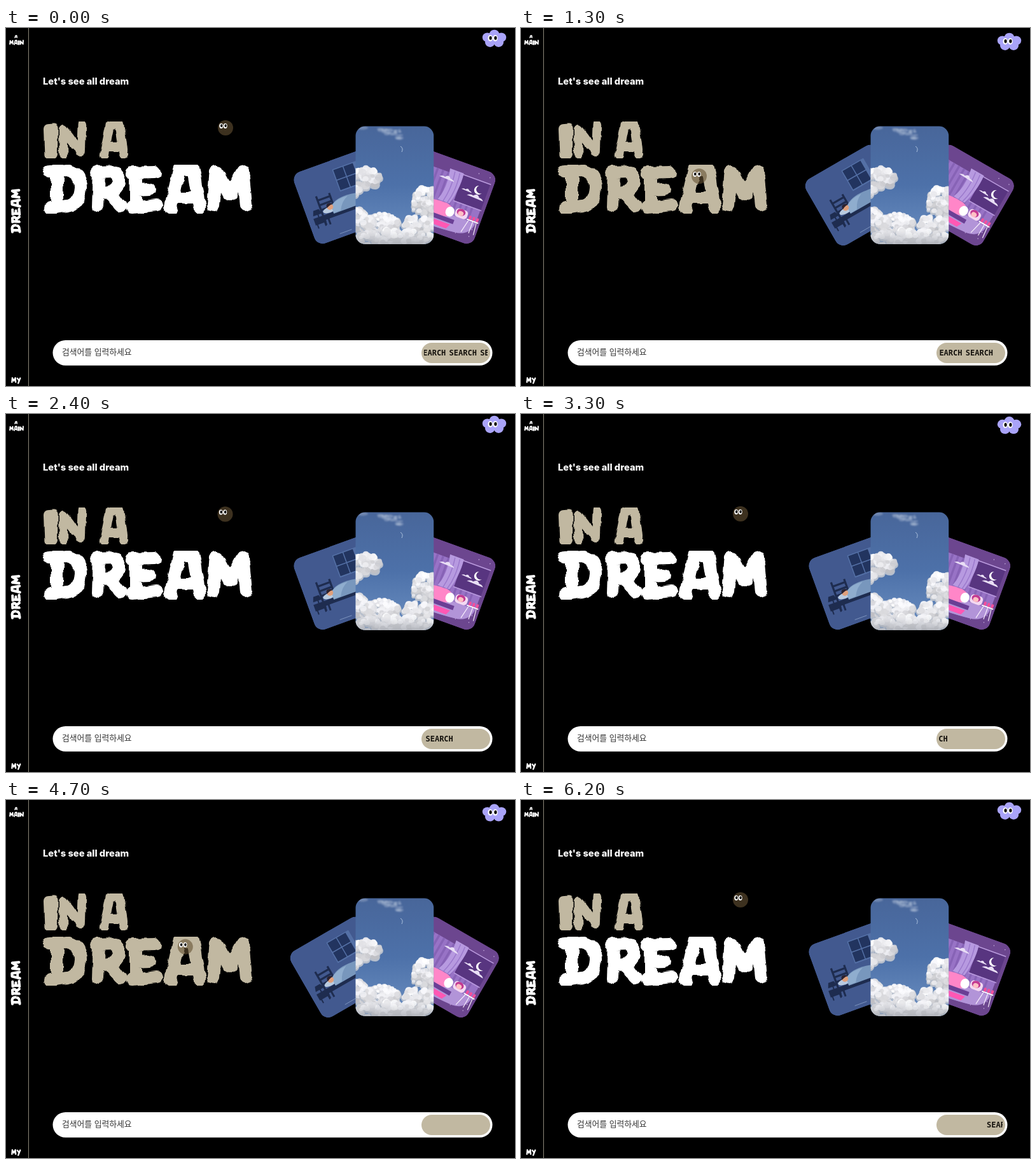
These frames come from a looping animation (800 by 563 pixels, 6300 ms). An HTML page:

```html
<!DOCTYPE html>
<html lang="ko">
<head>
<meta charset="utf-8">
<title>Dream</title>
<style>
  html, body { margin: 0; width: 100%; height: 100%; overflow: hidden; background: #000; }
  svg { display: block; width: 100vw; height: 100vh; }
  .ink { fill: none; stroke-width: 20; stroke-linecap: round; stroke-linejoin: round; }
  .lead { font: 800 14.7px Inter, "Open Sans", sans-serif; fill: #fff; }
  .hint { font: 12.8px "Noto Sans CJK KR", "Noto Sans CJK", sans-serif; fill: #333; }
  .roll { font: 700 12px "DejaVu Sans Mono", monospace; word-spacing: -2px; fill: #15120d; }
</style>
</head>
<body>
<svg id="stage" viewBox="0 0 800 563" preserveAspectRatio="none"></svg>
<script>
const TAN = '#c1b8a1', LOOP = 6300, STEP = 100;

// Brush letters: advance width and centre line in a box 85 high.
const BRUSH = {
  ' ': [26, ''],
  I: [34, 'M10 20L23 19L22 73H12Z'],
  N: [65, 'M12 71L11 21L52 68L54 11'],
  D: [70, 'M11 15L38 13Q61 16 60 41Q58 66 40 69L12 73M23 15V72'],
  R: [60, 'M14 16L44 15Q57 30 42 45L22 49M19 16L17 70M36 48L52 69'],
  E: [58, 'M11 17L46 16M17 17V70M17 44L38 43M10 71L50 67'],
  A: [69, 'M13 74L27 13L49 11L59 71M25 56H50'],
  M: [74, 'M12 68L17 15L37 52L58 14L63 67'],
  y: [60, 'M12 20L30 42M50 18L24 80']
};

function word(text, x, y, sx, sy, color, id = '') {
  let pen = 0, marks = '';
  for (const ch of text) {
    const [advance, d] = BRUSH[ch];
    marks += `<path d="${d}" transform="translate(${pen})"/>`;
    pen += advance;
  }
  return `<g ${id && `id="${id}"`} class="ink" role="img" aria-label="${text}" stroke="${color}"
    transform="translate(${x} ${y}) scale(${sx} ${sy})"><g filter="url(#wobble)">${marks}</g></g>`;
}

const rect = (x, y, w, h, fill, r = 0) =>
  `<rect x="${x}" y="${y}" width="${w}" height="${h}" rx="${r}" fill="${fill}"/>`;
const oval = (x, y, rx, ry, fill, more = '') =>
  `<ellipse cx="${x}" cy="${y}" rx="${rx}" ry="${ry}" fill="${fill}" ${more}/>`;
const path = (d, fill, more = '') => `<path d="${d}" fill="${fill}" ${more}/>`;
const line = (d, color, w) => path(d, 'none', `stroke="${color}" stroke-width="${w}"`);
const many = (n, make) => Array.from({ length: n }, (_, i) => make(i)).join('');
const eyes = (x, y, gap, rx, ry) => many(2, i =>
  oval(x + i * gap, y, rx, ry, '#fff') + oval(x + i * gap + .4, y - .3, rx * .55, ry * .6, '#000'));

let seed = 7;
const rnd = () => (seed = seed * 16807 % 2147483647) / 2147483647;

// A heap of puffs: grey bellies, then lit tops, small and irregular.
function heap(x, y, w, h, n) {
  let low = '', high = '';
  for (let i = 0; i < n; i++) {
    const a = rnd() * 6.283, d = Math.sqrt(rnd()), s = 3 + rnd() * 4.5;
    const px = x + Math.cos(a) * d * w, py = y + Math.sin(a) * d * h;
    const v = Math.round(205 + 45 * rnd() - 22 * Math.sin(a) * d);
    low += oval(px, py + 2, s, s * .9, '#b7bfcc');
    high += oval(px, py, s * .85, s * .75, `rgb(${v},${v},${v + 4})`, 'opacity=".85"');
  }
  return low + high;
}

function photo() {
  const wisps = many(26, () => {
    const f = rnd();
    return oval(588 + 34 * f, 158 + 14 * f * rnd() + 4 * rnd(), 2 + 4 * rnd(), 1 + 2 * rnd(), '#b5c4da', 'opacity=".35"');
  });
  return `<g clip-path="url(#front)">
    ${rect(549, 154, 124, 187, 'url(#sky)')}
    <g filter="url(#haze)">${wisps}${oval(560, 157, 9, 3, '#a9bad3', 'opacity=".4"')}</g>
    ${line('M620 186q5 3 2 9', '#a9bfdc', 1)}
    <g filter="url(#soft)">
      ${heap(564, 235, 24, 15, 70)}
      ${heap(550, 258, 8, 8, 14)}
      ${heap(660, 274, 25, 23, 100)}
      ${heap(554, 302, 12, 20, 36)}
      ${heap(588, 309, 28, 18, 90)}
      ${heap(650, 308, 26, 12, 60)}
      ${heap(611, 331, 64, 13, 150)}
    </g>
    ${rect(549, 318, 124, 23, 'url(#base)')}
  </g>`;
}

function night() {
  const ink = '#1e2c4f';
  return rect(-50, -66.5, 130, 120, '#42598f', 14) +
    rect(13, -52, 40, 37, '#5470a6', 1) +
    many(4, i => rect(14.5 + i % 2 * 17, -50.5 + (i >> 1) * 17.5, 15.5, 16, '#22345f')) +
    line('M-25-21V27M-4-19V6M-25-14H-4M-25-6H-4M-25 2H-4', ink, 3.2) +
    path('M-25 11H80V19H-25Z', ink) + rect(-20, 18, 3, 10, ink) +
    oval(-12, 6, 11, 4.5, '#b9cbe0') +
    path('M-7 1Q4-9 28-6Q50-3 80 2V14H-8Z', '#7897bd') +
    path('M-7 1Q4-7 22-5Q10 0 4 13H-8Z', '#8fadce') +
    oval(-10, 2, 5, 4.6, '#e0a07c') +
    path('M-15 2Q-16-5-9-4Q-5-3-5-1Q-10-1-15 2Z', '#2a2230') +
    path('M-37-1h9l3 8h-15Z', ink) + rect(-33, 6, 2, 6, ink) +
    rect(-41, 11, 18, 11, ink) + line('M-38 20V28M-26 20V28', ink, 2) +
    line('M-10 47H10', '#8fa5cc', .7);
}

function dusk() {
  const stars = many(40, () => oval(-40 + rnd() * 88, -64 + rnd() * 115, .7, .7, '#d9c4ee'));
  const bars = many(13, i => rect(-80 + i * 9, -44, 3.5, 62, '#8763b6'));
  const puff = (x, y, s) =>
    `<g transform="translate(${x} ${y}) scale(${s})">${path('M-12 0q5-4 9-2q5-6 9 0q5 0 7 3z', '#e9def5')}</g>`;
  return rect(-80, -66.5, 130, 120, '#6c468f', 14) + stars +
    path('M-80-44H20Q44-42 43-16V20Q40 40 16 42Q-20 46-80 44Z', '#9873c6') + bars +
    path('M-80 18H42Q40 40 16 42Q-20 46-80 44Z', '#b294d8') +
    rect(-1, -47, 45, 42, '#583580') + line('M-2-48H45M-2-4H45', '#b99add', 1.5) +
    path('M-24-50H-1Q2-26-6 2H-26Q-17-20-24-50Z', '#b79ae0') +
    line('M-15-48Q-11-22-17 2M-7-48Q-3-20-10 2', '#9b79cc', 1.5) +
    path('M28-40A7 7 0 1 0 36-30A6 6 0 0 1 28-40Z', '#fff') +
    puff(-24, -33, 1) + puff(28, -20, 1.1) + puff(12, -26, .7) +
    path('M-70 16Q-40 2-14 3Q0 2 4 14Q2 24-16 26H-70Z', '#ff86c8') +
    path('M-70 24H10V31H-70Z', '#6a3f95') +
    oval(-1, 14, 7, 8, '#fff') +
    rect(7, 4, 20, 14, '#f4d9f2', 5) + oval(16, 9, 7, 5.5, '#c23a92') + oval(16, 11, 4.4, 3.8, '#ffc0c4') +
    path('M-40 33H6L2 41H-44Z', '#ff58b4') +
    rect(28, 15, 19, 2, '#fff') + line('M31 17L26 38M38 17V36M44 17L46 36', '#f6ecfb', 1.2) +
    many(3, i => rect(30 + i * 6, 9, 4, 6, '#f2509c', 1));
}

const petals = many(5, i => {
  const a = (i * 72 - 90) * Math.PI / 180;
  return oval(11.5 * Math.cos(a), 1 + 7 * Math.sin(a), 7.8, 7.3, '#a9a3f8');
});

document.getElementById('stage').innerHTML = `
  <defs>
    <linearGradient id="sky" x2="0" y2="1">
      <stop stop-color="#48669a"/><stop offset=".5" stop-color="#4d71a9"/><stop offset="1" stop-color="#6b8fc1"/>
    </linearGradient>
    <linearGradient id="base" x2="0" y2="1">
      <stop stop-color="#a4a8b0" stop-opacity="0"/><stop offset="1" stop-color="#a4a8b0" stop-opacity=".7"/>
    </linearGradient>
    <filter id="soft"><feGaussianBlur stdDeviation=".6"/></filter>
    <filter id="haze"><feGaussianBlur stdDeviation="1.2"/></filter>
    <filter id="wobble" color-interpolation-filters="sRGB">
      <feTurbulence type="fractalNoise" baseFrequency=".07" numOctaves="1" seed="4"/>
      <feDisplacementMap in="SourceGraphic" scale="9" xChannelSelector="R" yChannelSelector="G"/>
    </filter>
    <clipPath id="front">${rect(549.5, 154.5, 122.7, 185.5, '#000', 15)}</clipPath>
    <clipPath id="slot">${rect(657, 497, 100, 28, '#000')}</clipPath>
    <clipPath id="cardL">${rect(-50, -66.5, 130, 120, '#000', 14)}</clipPath>
    <clipPath id="cardR">${rect(-80, -66.5, 130, 120, '#000', 14)}</clipPath>
  </defs>
  ${rect(0, 0, 800, 563, '#000')}
  ${rect(35, 0, 1, 563, '#8c8779')}
  ${word('A', 13, 11, .075, .06, '#fff')}
  ${word('MAIN', 5, 18.5, .095, .1, '#fff')}
  <g transform="translate(7 323) rotate(-90)">${word('DREAM', 0, 0, .212, .2, '#fff')}</g>
  ${word('My', 8, 548.5, .115, .125, '#fff')}
  <text class="lead" x="58" y="89">Let's see all dream</text>
  ${word('IN A', 59, 143.5, .686, .765, TAN)}
  ${word('DREAM', 57, 211, 1, 1, '#fff', 'title')}
  <g id="left"><g clip-path="url(#cardL)">${night()}</g></g>
  <g id="right"><g clip-path="url(#cardR)">${dusk()}</g></g>
  ${photo()}
  ${rect(73.5, 491, 691, 39.7, '#fff', 20)}
  <text class="hint" x="88" y="514">검색어를 입력하세요</text>
  ${rect(653, 495, 108, 32, TAN, 16)}
  <g clip-path="url(#slot)"><g id="roll" class="roll">
    <text x="788.5" y="515" text-anchor="end">SEARCH SEARCH SEARCH</text>
    <text x="953.3" y="515">SEARCH SEARCH SEARCH</text>
  </g></g>
  <g id="cloud">${petals}${oval(0, 1, 11, 8, '#a9a3f8')}${eyes(-6.3, 0, 7.8, 3.8, 5)}</g>
  <g id="ball">${oval(0, 0, 12, 12, 'rgb(101,82,52)', 'opacity=".6"')}${eyes(-6.7, -3, 6.4, 3, 4)}</g>`;

// The pointer visits the title twice; everything else follows from that.
const HOVERS = [[.8, 1.95], [3.9, 5.1]];
const ease = f => (f = Math.min(1, Math.max(0, f)), f * f * (3 - 2 * f));
const visit = (t, span, lead) => HOVERS.reduce((s, [a, b]) =>
  s + ease((t - a + lead) / span) - ease((t - b + lead) / span), 0);
const put = (id, name, v) => document.getElementById(id).setAttribute(name, v);

function draw(t) {
  const over = HOVERS.some(([a, b]) => t >= a && t < b);
  const angle = 20 + 10 * visit(t, .4, 0);
  const near = visit(t, 1, .5);
  put('title', 'stroke', over ? TAN : '#fff');
  put('left', 'transform', `translate(518 276) rotate(${-angle})`);
  put('right', 'transform', `translate(703.5 276) rotate(${angle})`);
  put('roll', 'transform', `translate(${-35.7 * t} 0)`);
  put('cloud', 'transform', `translate(767.5 ${18.2 - 2.8 * Math.cos((t + .3) * Math.PI * 2 / 3)})`);
  put('ball', 'transform', `translate(${345 - 65 * near} ${157 + 76 * near})`);
}

const start = performance.now();
function tick() {
  const ms = (performance.now() - start) % LOOP;
  draw(Math.floor(ms / STEP) * STEP / 1000);
  requestAnimationFrame(tick);
}
tick();
</script>
</body>
</html>
```
